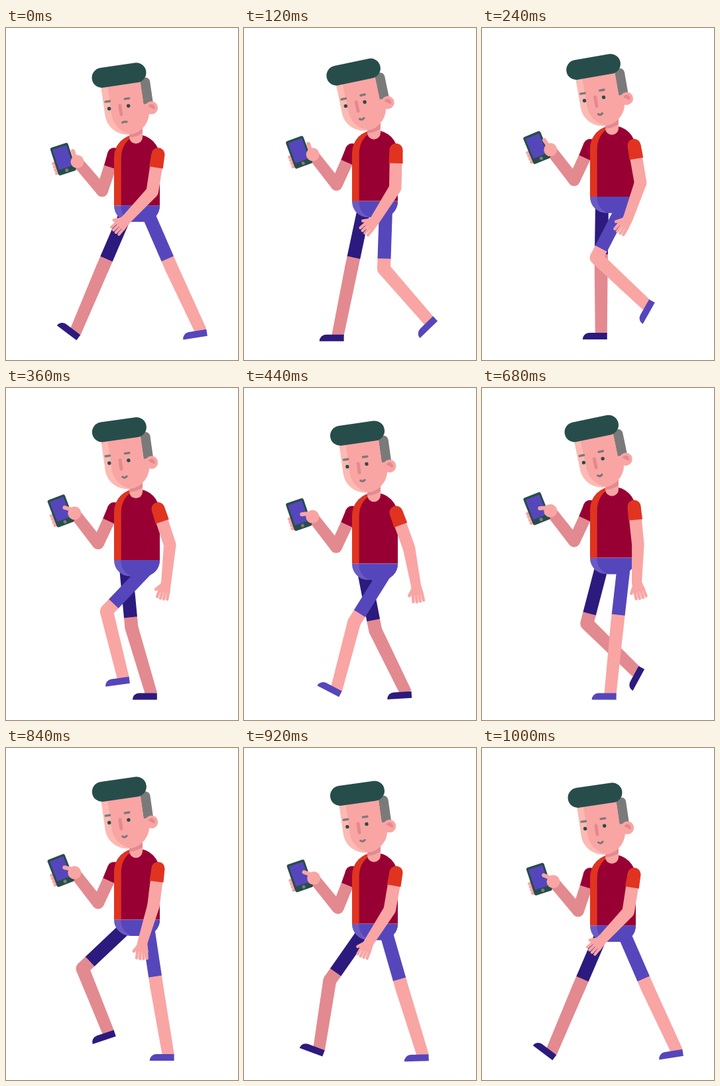
Recreate the animation shown at these times as an HTML page with a canvas. Size 350 by 500 pixels, loop 1040 ms.

```html
<!DOCTYPE html>
<html lang="en">
<head>
<meta charset="utf-8">
<title>Walking with a phone</title>
<style>
html, body { margin: 0; width: 100%; height: 100%; overflow: hidden; background: #fff; }
canvas { display: block; width: 350px; height: 500px; }
</style>
</head>
<body>
<canvas id="stage" width="350" height="500"></canvas>
<script>
const ctx = document.getElementById('stage').getContext('2d');
const LOOP = 1040, STEP = 40, CYCLE = 1000, RAD = Math.PI / 180;

const C = {
  skin: '#f9a5a4', skinDark: '#e28a90', skinLight: '#fcbab3',
  shirt: '#980033', orange: '#e03420',
  shorts: '#5646bb', shortsLight: '#6a5ac4', navy: '#2d1a7e',
  hair: '#274d4b', gray: '#7b7a7a'
};

// ---- Motion ----

const linear = u => u;
const easeOut = u => Math.sin(u * Math.PI / 2);
const easeBoth = u => (1 - Math.cos(u * Math.PI)) / 2;
const clamp = u => Math.min(1, Math.max(0, u));

// Cosine of the n-th harmonic of the walk cycle, shifted by degrees
const wave = (t, n, shift = 0) => Math.cos((t / CYCLE * 360 * n - shift) * RAD);

// Key points are [time, value, easing towards the next one]
function path(keys, t) {
  let i = 0;
  while (i < keys.length - 2 && t >= keys[i + 1][0]) i++;
  const [t0, v0, ease = linear] = keys[i], [t1, v1] = keys[i + 1];
  return v0 + (v1 - v0) * ease(clamp((t - t0) / (t1 - t0)));
}

// One step: the leg swings forward in the first half and carries weight in the second
const thighSwing = [[0, 23.5], [335, -47.5], [500, -23.3], [1000, 23.5]];
const shinSwing = [[0, 25, easeOut], [230, 47, easeBoth], [500, -23], [1000, 25]];
const footRoll = [[0, -9], [195, -66, easeBoth], [500, 37], [590, 0], [900, 0], [1000, -9]];
const thumbSwipe = [[0, 68], [140, 68, easeBoth], [520, -5, easeBoth], [1000, 28]];

function gait(t, softness) {
  const p = t % CYCLE;
  const u = (p + 250) % CYCLE / 430;
  const sag = u < 1 ? softness * Math.sin(u * Math.PI) : 0;
  return {
    thigh: path(thighSwing, p) - sag,
    shin: path(shinSwing, p) + sag,
    foot: path(footRoll, p)
  };
}

const waistAt = t => 260.3 + 6.3 * wave(t, 2, -4) + 0.7 * wave(t, 1);
const headTilt = t => -9.5 + 2 * wave(t, 2, 288) + 0.6 * wave(t, 4, 30);

// ---- Shapes ----

// Angle 0 points down, positive swings right
const reach = (p, angle, len) => [p[0] + Math.sin(angle * RAD) * len, p[1] + Math.cos(angle * RAD) * len];
const mix = (a, b, k) => a.map((v, i) => v + (b[i] - v) * k);

function disc(x, y, r, color) {
  ctx.fillStyle = color;
  ctx.beginPath();
  ctx.arc(x, y, r, 0, 7);
  ctx.fill();
}

function bar(x1, y1, x2, y2, width, color) {
  ctx.strokeStyle = color;
  ctx.lineWidth = width;
  ctx.lineCap = 'round';
  ctx.beginPath();
  ctx.moveTo(x1, y1);
  ctx.lineTo(x2, y2);
  ctx.stroke();
}

function box(x, y, w, h, radii, color) {
  ctx.fillStyle = color;
  ctx.beginPath();
  ctx.roundRect(x, y, w, h, radii);
  ctx.fill();
}

// Tapered limb with a round start and a flat end
function limb(a, b, wa, wb, color) {
  const dx = b[0] - a[0], dy = b[1] - a[1], n = Math.hypot(dx, dy) * 2;
  const px = -dy / n, py = dx / n;
  disc(a[0], a[1], wa / 2, color);
  ctx.beginPath();
  ctx.moveTo(a[0] + px * wa, a[1] + py * wa);
  ctx.lineTo(b[0] + px * wb, b[1] + py * wb);
  ctx.lineTo(b[0] - px * wb, b[1] - py * wb);
  ctx.lineTo(a[0] - px * wa, a[1] - py * wa);
  ctx.fill();
}

function at(p, angle, draw) {
  ctx.save();
  ctx.translate(p[0], p[1]);
  ctx.rotate(angle * RAD);
  draw();
  ctx.restore();
}

// ---- Body parts ----

function leg({ thigh, shin, foot }, hip, cloth, skin) {
  const hem = reach(hip, thigh, 74.5), knee = reach(hip, thigh, 90);
  limb(hem, knee, 20, 20, skin);
  limb(knee, reach(knee, shin, 105), 20, 18, skin);
  at(reach(knee, shin, 103), foot, () => box(-28, 0, 37, 10, [10, 0, 0, 0], cloth));
  limb(hip, hem, 20, 20, cloth);
}

function phoneArm(t, waist) {
  const k = easeBoth(clamp(Math.min(t, CYCLE - t) / 150));
  const shoulder = [163, waist - 77];
  const elbow = mix([145, waist - 22], [139, waist - 25], k);
  const hand = mix([107.5, waist - 66], [103.3, waist - 70.7], k);
  const phone = mix([86.3, waist - 69.8], [82.8, waist - 74], k);
  limb(shoulder, elbow, 19, 18, C.skinDark);
  limb(elbow, hand, 18, 17, C.skinDark);
  limb(shoulder, mix(shoulder, elbow, 0.35), 20, 18, C.shirt);

  at(phone, -20.3 + 2.2 * wave(t, 2), () => {
    for (let y = 2; y < 20; y += 5) bar(-16, y, -10, y, 5, C.skin);
    box(-14, -22, 28, 44, 3, C.hair);
    box(-11, -18.5, 22, 32, 1, C.shorts);
    disc(0, 17.6, 2.6, C.gray);
  });
  const thumb = path(thumbSwipe, t) * RAD;
  disc(hand[0], hand[1], 10, C.skin);
  bar(hand[0] - 3, hand[1] - 5, hand[0] - 1 - 15 * Math.cos(thumb), hand[1] - 3 - 14 * Math.sin(thumb), 6, C.skin);
}

function swingArm(t, waist) {
  const upper = 5 + 15 * wave(t, 1, 158);
  const lower = -13 + 26 * wave(t, 1, 193) - 5 * wave(t, 3);
  const hand = lower + 2 + 17 * wave(t, 1, 260);
  const shoulder = [229.5, waist - 77];
  const elbow = reach(shoulder, upper, 57), wrist = reach(elbow, lower, 58);
  limb(shoulder, elbow, 19, 18.5, C.skin);
  limb(elbow, wrist, 18.5, 15, C.skin);
  at(wrist, -hand, () => {
    limb([0, 0], [0, 14], 15, 19, C.skin);
    for (let i = -1.5; i < 2; i++) bar(i * 4.5, 11, i * 5.2, 24.5 - Math.abs(i), 4.4, C.skin);
    bar(-5, 3, -12.5, 13, 4.6, C.skin);
  });
  limb(shoulder, reach(shoulder, upper, 20), 20, 21, C.orange);
}

function torso(waist) {
  ctx.save();
  ctx.beginPath();
  ctx.roundRect(163, waist - 107, 69, 107, [34.5, 34.5, 0, 0]);
  ctx.clip();
  box(163, waist - 107, 69, 107, 0, C.shirt);
  ctx.fillStyle = C.orange;
  ctx.beginPath();
  ctx.moveTo(163, waist);
  ctx.lineTo(173.7, waist);
  ctx.lineTo(173.7, waist - 72);
  ctx.quadraticCurveTo(174, waist - 92, 190, waist - 103);
  ctx.lineTo(190, waist - 108);
  ctx.lineTo(163, waist - 108);
  ctx.fill();
  ctx.restore();
}

function pelvis(waist) {
  box(163, waist, 69, 24.5, [0, 0, 24, 24], C.shortsLight);
  ctx.save();
  ctx.clip();
  box(173.5, waist, 69, 26, [0, 0, 0, 24], C.shorts);
  ctx.restore();
}

function neck(waist) {
  box(186, waist - 122, 20, 29, [0, 0, 10, 10], C.skin);
  ctx.fillStyle = C.skinDark;
  ctx.beginPath();
  ctx.moveTo(186, waist - 122);
  ctx.lineTo(206, waist - 122);
  ctx.lineTo(206, waist - 109);
  ctx.quadraticCurveTo(197, waist - 103, 186, waist - 102.5);
  ctx.fill();
}

function head(t, waist) {
  at([196, waist - 107], headTilt(t), () => {
    box(14, -83, 18.5, 46, [0, 7, 0, 0], C.gray);

    const jaw = [0, 0, 33.5, 33.5];
    ctx.save();
    ctx.beginPath();
    ctx.rect(-42, -84, 60, 41);
    ctx.roundRect(-42, -43, 67, 41.5, jaw);
    ctx.clip();
    box(-42, -84, 67, 84, 0, C.skinLight);
    box(-32, -84, 67, 83.5, jaw, C.skin);
    ctx.restore();

    disc(29, -36.3, 9.7, C.skin);
    ctx.fillStyle = C.skinDark;
    ctx.beginPath();
    ctx.arc(29, -36.5, 5.3, -150 * RAD, 40 * RAD);
    ctx.fill();

    for (const x of [-34.3, -4.9]) {
      disc(x, -44.2, 2.7, C.hair);
      bar(x - 4, -55.3, x + 2.5, -55.3, 3.4, C.gray);
    }
    bar(-17.5, -46.5, -17.5, -33, 5, C.skinDark);

    const smile = -1 + 4 * easeBoth(clamp(t / 120));
    ctx.strokeStyle = C.gray;
    ctx.lineWidth = 3.2;
    ctx.beginPath();
    ctx.moveTo(-17.5, -20.8);
    ctx.quadraticCurveTo(-14.2, -20.8 + smile, -11, -20.8);
    ctx.stroke();

    bar(-38.5, -92, 14, -92, 30, C.hair);
  });
}

function draw(t) {
  const waist = waistAt(t);
  ctx.fillStyle = '#fff';
  ctx.fillRect(0, 0, 350, 500);
  phoneArm(t, waist);
  leg(gait(t + CYCLE / 2, 7), [181, waist + 12], C.navy, C.skinDark);
  pelvis(waist);
  leg(gait(t, 0), [214, waist + 12], C.shorts, C.skin);
  torso(waist);
  neck(waist);
  head(t, waist);
  swingArm(t, waist);
}

const start = performance.now();
function tick() {
  const t = (performance.now() - start) % LOOP;
  draw(Math.floor(t / STEP) * STEP);
  requestAnimationFrame(tick);
}
tick();
</script>
</body>
</html>
```
